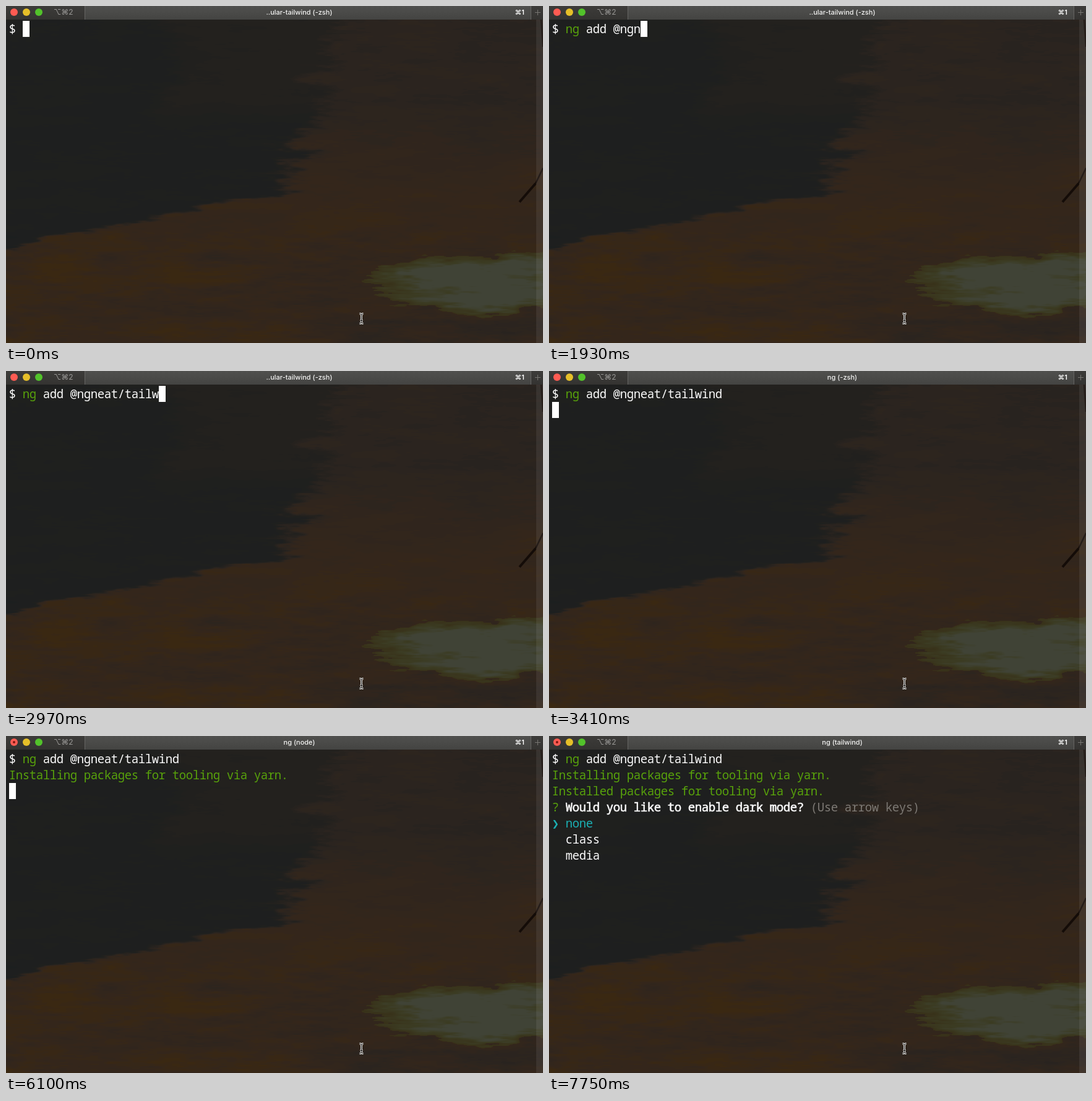
An HTML page with a canvas for the animation above (8 s loop, 868 by 545 pixels).

```html
<!DOCTYPE html>
<html lang="en">
<head>
<meta charset="utf-8">
<title>Terminal</title>
<style>
html, body { margin: 0; width: 100%; height: 100%; overflow: hidden; background: #241f1b; }
canvas { display: block; width: 868px; height: 545px; }
</style>
</head>
<body>
<canvas id="stage" width="868" height="545"></canvas>
<script>
const W = 868, H = 545, LOOP = 8000;
const BAR = 22, CELL = 11, ROW = 26, LEFT = 5, TOP = 24;
const MONO = '"Noto Sans Mono", "DejaVu Sans Mono", monospace';
const UI = 'Inter, "DejaVu Sans", sans-serif';
const WHITE = '#fbfbfb', GREEN = '#58a20b', CYAN = '#1bb0b4', GREY = '#7d7974';

// Keys pressed in each tick, ticks divided by bars.
const TICK = 148;
const KEYS = '|||ng| |ad||d ||@||ng||n|ea|t/||ta||il|w|in|d'.split('|');
const ENTER = 3410, INSTALL = 4160, RUN = 4900, PROMPT = 7600, ASK = 7750;

const rgb = hex => [1, 3, 5].map(i => parseInt(hex.slice(i, i + 2), 16));
const SKY = ['#1c1f1f', '#22201e', '#2b241f', '#33261c', '#3a2812'].map(rgb);
const LIGHT = ['#383119', '#3b3b22', '#404336'].map(rgb);

const clamp = v => Math.min(1, Math.max(0, v));
function smooth(a, b, v) {
  const k = clamp((v - a) / (b - a));
  return k * k * (3 - 2 * k);
}

function shade(colors, v) {
  const p = clamp(v) * (colors.length - 1);
  const i = Math.min(colors.length - 2, Math.floor(p));
  return colors[i].map((c, j) => c + (colors[i + 1][j] - c) * (p - i));
}

function hash(x, y) {
  let h = Math.imul(x, 374761393) + Math.imul(y, 668265263) | 0;
  h = Math.imul(h ^ h >>> 13, 1274126177);
  return ((h ^ h >>> 16) >>> 0) / 4294967296;
}

function noise(x, y) {
  const i = Math.floor(x), j = Math.floor(y);
  const u = smooth(0, 1, x - i), v = smooth(0, 1, y - j);
  const top = hash(i, j) * (1 - u) + hash(i + 1, j) * u;
  const low = hash(i, j + 1) * (1 - u) + hash(i + 1, j + 1) * u;
  return top * (1 - v) + low * v - 0.5;
}

// Wide, flat streaks like brush strokes, about -0.5 to 0.5.
const streaks = (x, y) =>
  0.5 * noise(x / 85, y / 17) + 0.3 * noise(x / 34, y / 6) + 0.2 * noise(x / 13, y / 2.2);

function skyColor(x, y) {
  const n = streaks(x, y);

  // sun behind the clouds, lower right
  const sun = 1 - ((x - 785) / 215) ** 2 - ((y - 449) / 50) ** 2 + n * 1.7;
  if (sun > 0) return shade(LIGHT, sun * 1.4);
  const rays = 0.3 - ((x - 650) / 260) ** 2 - ((y - 440) / 110) ** 2 + n;
  if (rays > 0.34) return LIGHT[0];

  // storm cloud, upper left
  const edge = 545 - 0.37 * (y - BAR) - 4.5 * Math.max(0, y - 300);
  const open = smooth(-25, 25, x - edge + n * 130);
  const veil = smooth(225, 285, x + n * 90) * (1 - smooth(150, 200, y)) * (1 - open);
  const warm = smooth(130, 330, y);
  const dusk = smooth(495, 515, y) * smooth(450, 600, x);
  const v = 0.1 + 0.17 * veil + open * (0.4 + 0.3 * warm) - 0.2 * dusk
    + n * (0.1 + 0.2 * open + 0.35 * smooth(330, 410, y));
  return shade(SKY, Math.round(v * 14) / 14);
}

function paintSky(c) {
  const img = c.createImageData(W, H);
  for (let y = 0; y < H; y++) {
    for (let x = 0; x < W; x++) {
      img.data.set([...skyColor(x, y), 255], (y * W + x) * 4);
    }
  }
  c.putImageData(img, 0, 0);

  // twig
  c.strokeStyle = '#140c08';
  c.lineWidth = 4;
  line(c, 830, 317, 856, 287);
  c.lineWidth = 2.5;
  line(c, 856, 287, 868, 262);
  line(c, 865, 22, 868, 66);

  // scroll track
  c.fillStyle = 'rgba(255,255,255,.07)';
  c.fillRect(857, BAR, 11, H - BAR);
}

function line(c, x1, y1, x2, y2) {
  c.beginPath();
  c.moveTo(x1, y1);
  c.lineTo(x2, y2);
  c.stroke();
}

function dot(c, color, x, y, r) {
  c.fillStyle = color;
  c.beginPath();
  c.arc(x, y, r, 0, Math.PI * 2);
  c.fill();
}

function label(c, text, x, color, align, weight = 500, size = 11) {
  c.font = `${weight} ${size}px ${UI}`;
  c.textAlign = align;
  c.fillStyle = color;
  c.fillText(text, x, 14);
}

function tab(c, x, w, top, bottom) {
  const g = c.createLinearGradient(0, 0, 0, BAR);
  g.addColorStop(0, top);
  g.addColorStop(1, bottom);
  c.fillStyle = g;
  c.fillRect(x, 0, w, BAR);
}

function paintBar(c) {
  tab(c, 0, W, '#3d3c3a', '#343331');
  tab(c, 128, 720, '#50504e', '#444442');
  c.fillStyle = '#666563';
  c.fillRect(127, 0, 1, BAR);
  c.fillRect(848, 0, 1, BAR);
  c.fillStyle = '#777572';
  c.fillRect(855, 10, 9, 1);
  c.fillRect(859, 6, 1, 9);
  ['#ff5b52', '#e6bf29', '#52c22b'].forEach((color, i) => dot(c, color, 13 + i * 20, 10, 6));
  label(c, '⌥⌘2', 77, '#9a9997', 'left', 400, 12);
  label(c, '⌘1', 838, WHITE, 'right', 600);
}

// I-beam: white rim around a thin dark core.
function paintPointer(c, x, y) {
  for (const [color, width] of [['#ececea', 3], ['#141210', 1]]) {
    c.strokeStyle = color;
    c.lineWidth = width;
    for (const side of [-1, 1]) {
      c.beginPath();
      c.moveTo(x + side * 3, y - 8);
      c.quadraticCurveTo(x, y - 8, x, y - 5);
      c.lineTo(x, y + 5);
      c.quadraticCurveTo(x, y + 8, x + side * 3, y + 8);
      c.stroke();
    }
    line(c, x - 2, y + 3, x + 2, y + 3);
  }
}

const ctx = document.getElementById('stage').getContext('2d');
const backdrop = document.createElement('canvas');
backdrop.width = W;
backdrop.height = H;
const back = backdrop.getContext('2d');
paintSky(back);
paintBar(back);
paintPointer(back, 574.5, 505.5);

function print(text, col, row, color, strong = false) {
  ctx.font = `19px ${MONO}`;
  ctx.textAlign = 'center';
  ctx.fillStyle = ctx.strokeStyle = color;
  ctx.lineWidth = 0.6;
  [...text].forEach((ch, i) => {
    const x = LEFT + (col + i + 0.5) * CELL, y = TOP + row * ROW + 20;
    ctx.fillText(ch, x, y);
    if (strong) ctx.strokeText(ch, x, y);
  });
}

function block(col, row) {
  ctx.fillStyle = '#fff';
  ctx.fillRect(LEFT + col * CELL, TOP + row * ROW, CELL, ROW);
}

function title(t) {
  if (t < ENTER) return '..ular-tailwind (-zsh)';
  if (t < INSTALL) return 'ng (-zsh)';
  return t >= RUN && t < ASK ? 'ng (node)' : 'ng (tailwind)';
}

function draw(t) {
  ctx.drawImage(backdrop, 0, 0);
  label(ctx, title(t), 474, '#f4f4f3', 'center');

  const typed = KEYS.slice(0, Math.floor(t / TICK) + 1).join('');
  print('$', 0, 0, WHITE);
  print(typed.slice(0, 2), 2, 0, GREEN);
  print(typed.slice(2), 4, 0, WHITE);

  if (t >= INSTALL) {
    dot(ctx, '#7d1712', 13, 10, 2);
    print('Installing packages for tooling via yarn.', 0, 1, GREEN);
  }
  if (t >= PROMPT) {
    print('Installed packages for tooling via yarn.', 0, 2, GREEN);
    print('?', 0, 3, GREEN);
    print('Would you like to enable dark mode?', 2, 3, WHITE, true);
    print('(Use arrow keys)', 38, 3, GREY);
    print('❯', 0, 4, CYAN);
    ['none', 'class', 'media'].forEach((mode, i) => print(mode, 2, 4 + i, i ? WHITE : CYAN));
  } else if (t >= INSTALL) {
    block(0, 2);
  } else if (t >= ENTER) {
    block(0, 1);
  } else {
    block(2 + typed.length, 0);
  }
}

const start = performance.now();
function tick() {
  draw((performance.now() - start) % LOOP);
  requestAnimationFrame(tick);
}
tick();
</script>
</body>
</html>
```
